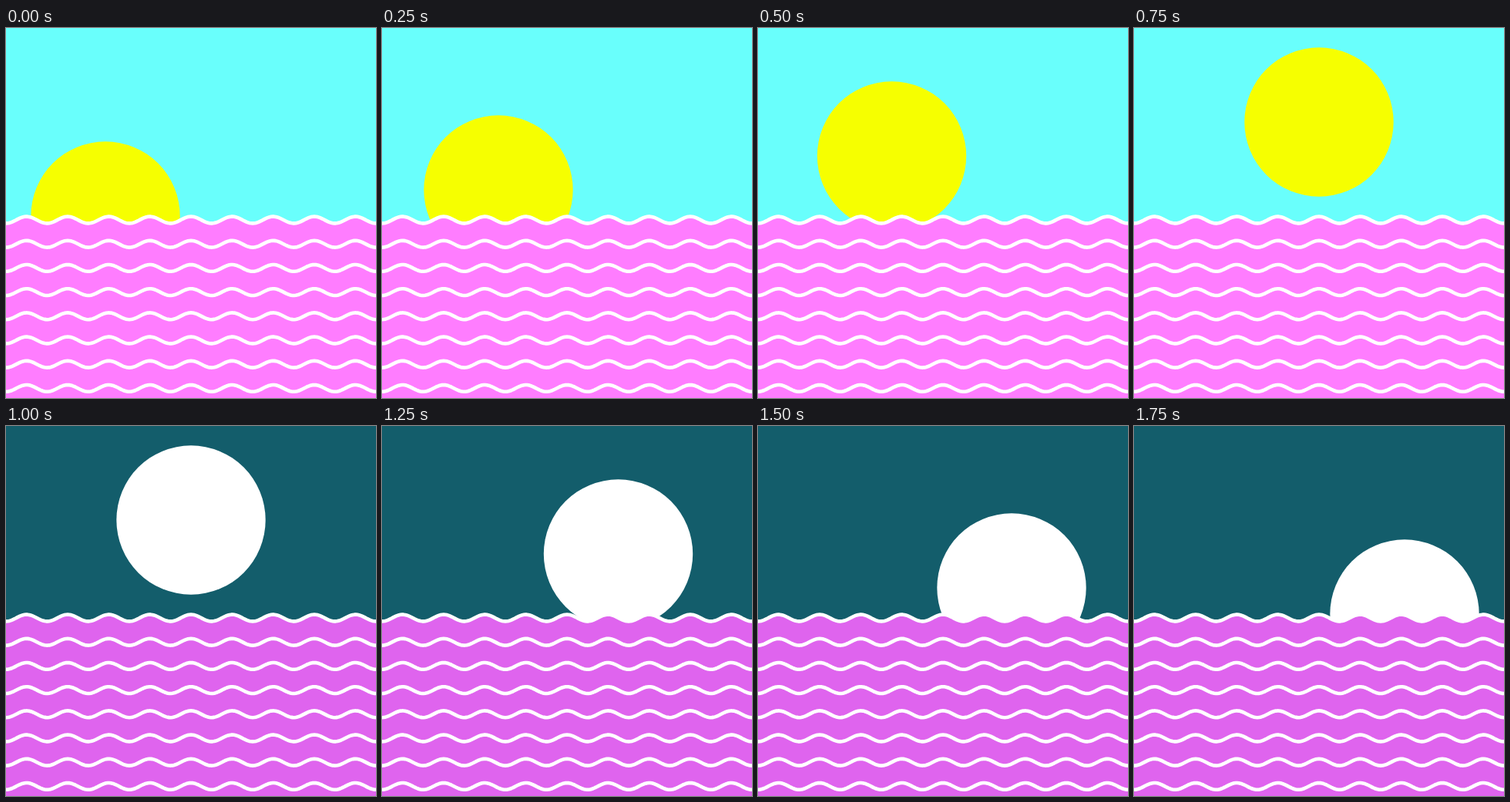
Animation, 480 px wide and 480 px high, one loop 2000 ms. Source, as an HTML page with a canvas:

```html
<!DOCTYPE html>
<html lang="en">
<head>
<meta charset="utf-8">
<title>Sun and moon over the sea</title>
<style>
html, body { margin: 0; height: 100%; overflow: hidden; }
canvas { display: block; width: 480px; height: 480px; }
</style>
</head>
<body>
<canvas id="stage" width="480" height="480"></canvas>
<script>
const ctx = document.getElementById('stage').getContext('2d');
const SIZE = 480, STEP = 250, STEPS = 8;
const RADIUS = 96.7, PERIOD = SIZE / 9, AMP = 4.4;
const FIRST_ROW = 249, ROW_GAP = 31.2, ROWS = 8;

const day = { sky: '#69fffc', sea: '#ff7dff', disc: '#f6ff00' };
const night = { sky: '#135d6b', sea: '#df64ee', disc: '#ffffff' };

// Rising positions; the moon sets along the mirrored path.
const rise = [[129, 244], [151, 210], [173.5, 166], [240, 122]];

function wave(y) {
  ctx.beginPath();
  for (let x = -4; x <= SIZE + 4; x += 2)
    ctx.lineTo(x, y - AMP * Math.cos((x - SIZE / 2) / PERIOD * 2 * Math.PI));
}

function draw(step) {
  const isDay = step < STEPS / 2;
  const colors = isDay ? day : night;
  const [px, y] = rise[isDay ? step : STEPS - 1 - step];
  const x = isDay ? px : SIZE - px;

  ctx.fillStyle = colors.sky;
  ctx.fillRect(0, 0, SIZE, SIZE);

  ctx.fillStyle = colors.disc;
  ctx.beginPath();
  ctx.arc(x, y, RADIUS, 0, 2 * Math.PI);
  ctx.fill();

  ctx.fillStyle = colors.sea;
  wave(FIRST_ROW);
  ctx.lineTo(SIZE + 4, SIZE);
  ctx.lineTo(-4, SIZE);
  ctx.fill();

  ctx.strokeStyle = '#fff';
  ctx.lineWidth = 4.6;
  ctx.lineJoin = 'round';
  for (let i = 0; i < ROWS; i++) {
    wave(FIRST_ROW + i * ROW_GAP);
    ctx.stroke();
  }
}

const start = performance.now();
function tick() {
  draw(Math.floor((performance.now() - start) / STEP) % STEPS);
  requestAnimationFrame(tick);
}
tick();
</script>
</body>
</html>
```
